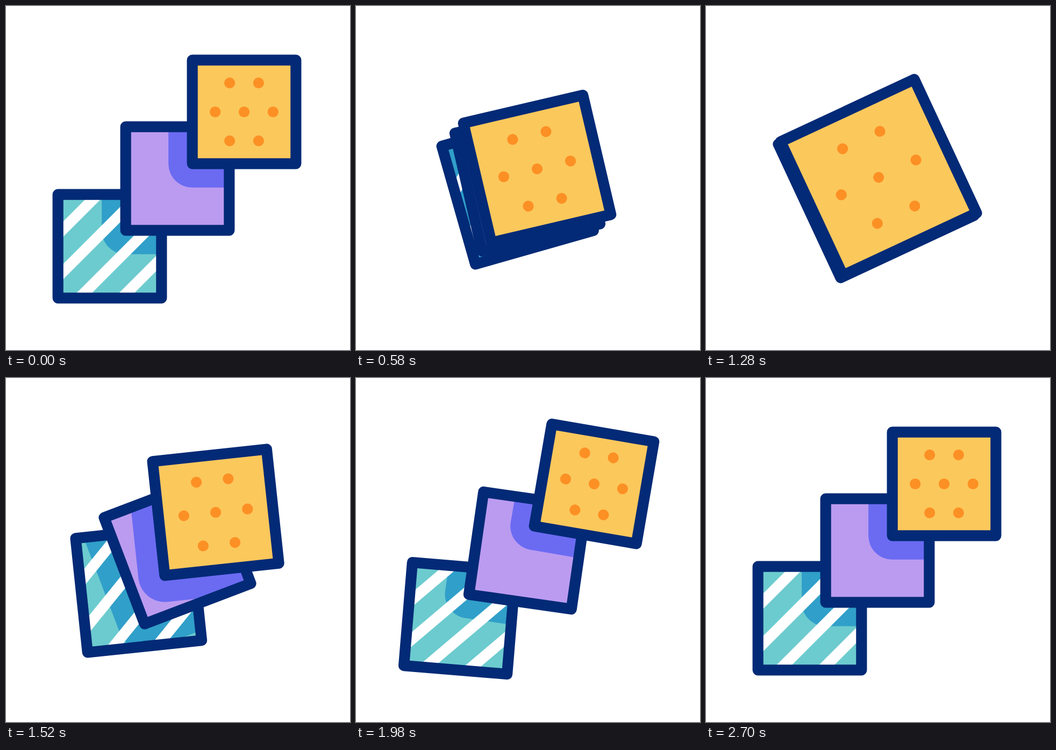
Animation of 640x640 px, one loop 3 s. Source, as an HTML page:

```html
<!DOCTYPE html>
<html lang="en">
<head>
<meta charset="utf-8">
<title>Fabric swatches</title>
<style>
  html, body { margin: 0; width: 100%; height: 100%; overflow: hidden; background: #fff; }
  svg { display: block; width: 100%; height: 100%; }
</style>
</head>
<body>
<svg id="stage" viewBox="0 0 640 640"></svg>
<script>
const NS = "http://www.w3.org/2000/svg";
const LOOP = 3000, STEP = 20;
const HALF = 96.35, LINE = 20.2, NAVY = "#032a76";
const stage = document.getElementById("stage");

function add(parent, tag, attrs = {}) {
  const el = document.createElementNS(NS, tag);
  for (const key in attrs) el.setAttribute(key, attrs[key]);
  parent.appendChild(el);
  return el;
}

const square = (parent, attrs) => add(parent, "rect", {
  x: -HALF, y: -HALF, width: 2 * HALF, height: 2 * HALF, ...attrs
});

// From back to front; shift is the offset along the diagonal, angles are clockwise degrees
const cards = [
  { fill: "#6ccbcf", shade: "#309fc9", shift: -126, grow: 0.5, lift: 0.85,
    tilt: -25, turn: 1299, swing: 25.3, back: -21.8 },
  { fill: "#bb9bf0", shade: "#6b6bf2", shift: 0, grow: 0.455, lift: 1.23,
    tilt: -25, turn: 1450, swing: 21.2, back: -8.65 },
  { fill: "#fbc85c", shift: 124, grow: 0.5, lift: 1.2,
    tilt: -25, turn: 1299, swing: 25, back: -9.9 }
];

const defs = add(stage, "defs");

cards.forEach((card, i) => {
  const clip = add(defs, "clipPath", { id: "clip" + i });
  const inside = add(stage, "g", { "clip-path": `url(#clip${i})` });
  card.placed = [square(clip), square(inside, { fill: card.fill })];
  card.lines = [];

  if (card.shade) {
    card.shadow = square(inside, {
      fill: card.shade, stroke: card.shade, "stroke-width": 89, "stroke-linejoin": "round"
    });
  }
  if (i === 0) {
    const stripes = add(inside, "g", { stroke: "#fff" });
    card.placed.push(stripes);
    card.lines.push(stripes);
    for (const k of [-3, -1, 1, 3]) {
      const d = k * 39.5;
      add(stripes, "path", { d: `M${d / 2 - 200} ${d / 2 + 200}l400 -400` });
    }
  }
  if (i === 2) {
    // Zero-length round caps keep the dots one size while the card grows
    const dots = add(inside, "g", { stroke: "#fc9024", "stroke-linecap": "round" });
    card.placed.push(dots);
    card.lines.push(dots);
    for (const [x, y] of [[-1, -2], [1, -2], [-2, 0], [0, 0], [2, 0], [-1, 2], [1, 2]])
      add(dots, "path", { d: `M${x * 26.9} ${y * 26.9}h0` });
  }
  const border = square(stage, { fill: "none", stroke: NAVY, "stroke-linejoin": "round" });
  card.placed.push(border);
  card.lines.push(border);
});

const part = (t, a, b) => Math.min(1, Math.max(0, (t - a) / (b - a)));
const ease = (t, a, b) => {
  const x = part(t, a, b);
  return x * x * (3 - 2 * x);
};
const mix = (a, b, k) => a + (b - a) * k;

function angle(card, t) {
  if (t < card.turn) return card.tilt * Math.sin(part(t, 200, 1150) * Math.PI / 2) ** card.lift;
  if (t < 1828) return mix(card.tilt, card.swing, ease(t, card.turn, 1828));
  if (t < 2160) return mix(card.swing, card.back, ease(t, 1828, 2160));
  return mix(card.back, 0, ease(t, 2160, 2700));
}

function draw(t) {
  const spread = 1 - ease(t, 200, 700) + ease(t, 1240, 1750);
  const size = ease(t, 180, 1150) - ease(t, 1150, 1678);
  for (const card of cards) {
    const d = card.shift * spread, s = 1 + card.grow * size;
    card.pose = `translate(${319 + d} ${321 - d}) rotate(${angle(card, t)}) scale(${s})`;
    for (const el of card.placed) el.setAttribute("transform", card.pose);
    for (const el of card.lines) el.setAttribute("stroke-width", LINE / s);
  }
  // Each card receives the shadow of the one above it
  cards.forEach((card, i) => {
    if (card.shadow) card.shadow.setAttribute("transform", cards[i + 1].pose);
  });
}

const start = performance.now();
function tick() {
  const t = (performance.now() - start) % LOOP;
  draw(Math.floor(t / STEP) * STEP);
  requestAnimationFrame(tick);
}
tick();
</script>
</body>
</html>
```
